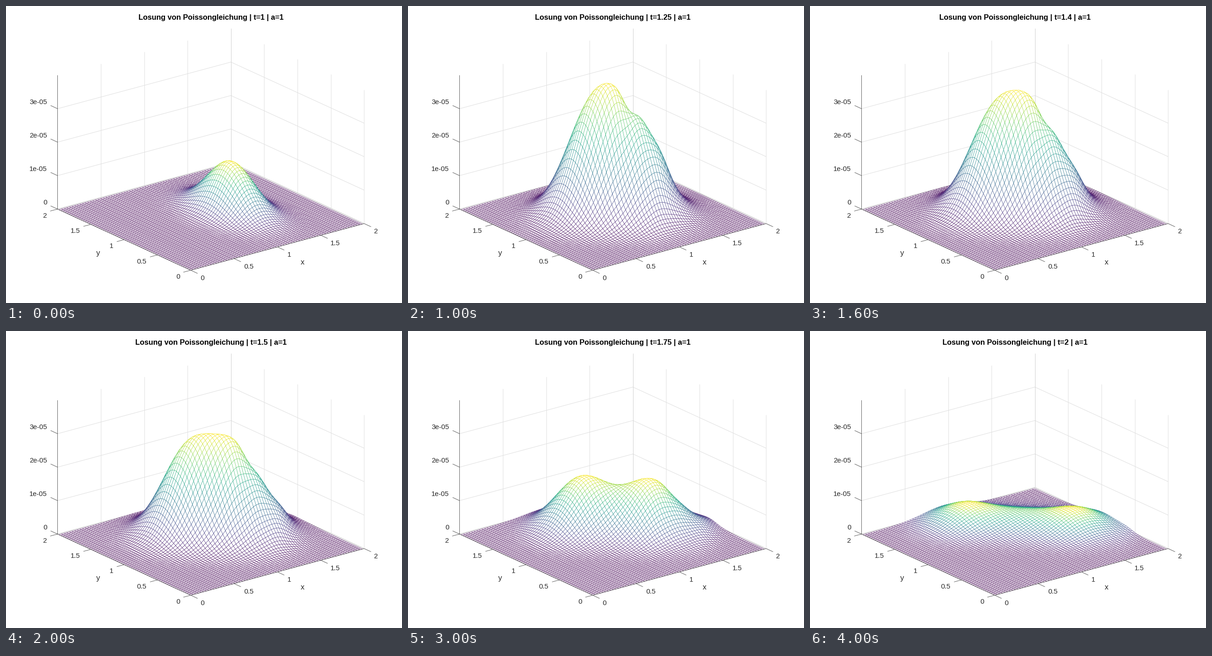
These frames come from a looping animation (864 px wide and 648 px high, 4200 ms). A matplotlib script:

```python
import numpy as np
import matplotlib.pyplot as plt
from matplotlib.animation import FuncAnimation
from matplotlib.collections import LineCollection, PolyCollection

W, H, DPI = 864, 648, 100
FRAMES, INTERVAL = 21, 200
PX = 72 / DPI                      # points per pixel
UNIT = 73.0                        # pixels per 1e-5 of height
DARK, GRID = "#262626", "#dfdfdf"

plt.rcParams["font.family"] = "Liberation Sans"


def project(x, y, lift=0.0):
    """Orthographic view: data coordinates to stage pixels."""
    return (403 + 189.2 * x - 145.3 * y,
            576.5 - 50.9 * x - 66.7 * y - lift)


def bell(d, width):
    return np.exp(-(d / width) ** 2)


def surface(x, y, t):
    """A seed bump grows into a ridge that splits in two and fades."""
    grown = min((t - 1) / 0.2, 1)
    age = t - 1.25
    height = 203 * grown * bell(t - 1.3, 0.55)
    spread = 0.2 + 0.56 * max(age, 0) ** 2
    skew = 0.5 * max(1.4 - t, 0)
    saddle = 1.6 * max(t - 1.62, 0)
    crease = 0.14 + 0.72 * age

    along = (x + y) / np.sqrt(2) - (1.45 + 0.5 * age)
    across = (x - y) / np.sqrt(2)
    ridge = ((1 + skew) * bell(across + spread, 0.34)
             + (1 - skew) * bell(across - spread, 0.34)
             + saddle * bell(across, 0.34)
             - 0.2 * (2 - t) * bell(across - crease, 0.09)
             + 0.09 * bell(across - crease - 0.3, 0.1))
    seed = 108 * (1 - grown) * bell(x - 1.23, 0.24) * bell(y - 1, 0.4)
    return np.maximum(height * ridge * bell(along, 0.35) + seed, 0)


fig = plt.figure(figsize=(W / DPI, H / DPI), dpi=DPI, facecolor="white")
ax = fig.add_axes([0, 0, 1, 1])
ax.set_xlim(0, W)
ax.set_ylim(H, 0)
ax.axis("off")


def lines(segments, color, width, zorder):
    ax.add_collection(LineCollection(segments, colors=color,
                                     linewidths=width * PX, zorder=zorder))


def label(x, y, text, size=15, ha="center", **style):
    return ax.text(x, y, text, fontsize=size * PX, ha=ha, va="baseline",
                   **{"color": DARK, "zorder": 5, **style})


# Back walls
top = 4 * UNIT
walls = []
for v in np.arange(0, 2, 0.5):
    walls.append([project(v + 0.5, 2), project(v + 0.5, 2, top)])
    walls.append([project(2, v), project(2, v, top)])
for k in (1, 2, 3):
    walls.append([project(0, 2, k * UNIT), project(2, 2, k * UNIT),
                  project(2, 0, k * UNIT)])
lines(walls, GRID, 1, 0)
lines([[project(0, 2), project(2, 2), project(2, 0)]], "#b5b5b5", 0.9, 0)
lines([[project(2, 2), project(2, 2, top)]], "#d0d0d0", 1, 0)

# Front axes, ticks and labels
axes = [[project(0, 2, top), project(0, 2), project(0, 0), project(2, 0)]]


def tick(point, dx, dy):
    axes.append([point, (point[0] + dx, point[1] + dy)])


for k in range(4):
    px, py = project(0, 2, k * UNIT)
    tick((px, py), -15, -7)
    label(89.5, py - 10, f"{k}e-05" if k else "0", ha="right")
for v in np.arange(0, 2.5, 0.5):
    px, py = project(v, 0)
    tick((px, py), 15, 7)
    label(px + 21.3, py + 21.5, f"{v:g}", ha="left")
    px, py = project(0, v)
    tick((px, py), -16, 4.3)
    label(px - 23.5, py + 18.5, f"{v:g}", ha="right")
lines(axes, "#3c3c3c", 0.8, 4)
label(646.5, 564, "x", 16.4)
label(201.5, 544, "y", 16.4)
title = label(447, 30, "", 16.4, color="black", weight="bold")

# Mesh cells, ordered from the far corner to the near one
nodes = np.arange(0, 2, 0.03)[::-1]
X, Y = np.meshgrid(nodes, nodes)


def corners(a):
    return np.stack([a[:-1, :-1], a[1:, :-1], a[1:, 1:], a[:-1, 1:]],
                    axis=-1).reshape(-1, 4)


mesh = PolyCollection([], facecolors="white", linewidths=0.55 * PX, zorder=2)
ax.add_collection(mesh)


def update(frame):
    t = 1 + frame * 0.05
    z = surface(X, Y, t)
    px, py = project(X, Y, z)
    mesh.set_verts(np.stack([corners(px), corners(py)], axis=-1))
    mesh.set_edgecolor(plt.cm.viridis(corners(z).mean(axis=1) / z.max()))
    title.set_text(f"Losung von Poissongleichung | t={t:g} | a=1")
    return mesh, title


anim = FuncAnimation(fig, update, frames=FRAMES, interval=INTERVAL,
                     repeat=True, repeat_delay=0)
plt.show()
```
